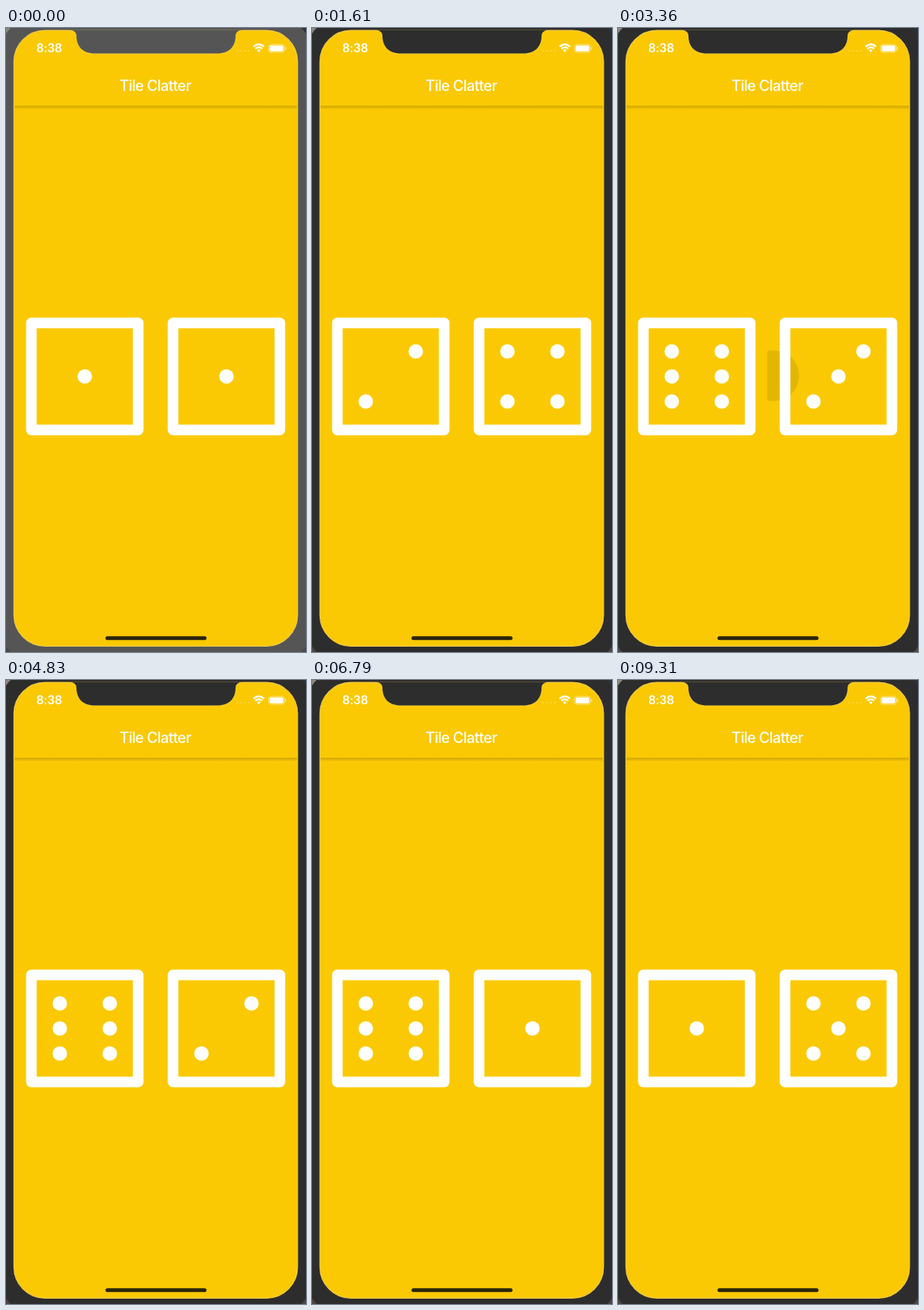
These frames come from a looping animation (396 by 822 pixels, 9.38 s). An HTML page without scripts:

```html
<!DOCTYPE html>
<html lang="en">
<head>
<meta charset="utf-8">
<title>Dice roller</title>
<style>
  html, body { margin: 0; width: 100%; height: 100%; overflow: hidden; background: #4a4846; }
  svg { display: block; width: 100vw; height: 100vh; }
  :root {
    --loop: 9.38s;
    --one: path("M0 0h0");
    --two: path("M33-33h0M-33 33h0");
    --three: path("M33-33h0M0 0h0M-33 33h0");
    --four: path("M-33-33h0M33-33h0M-33 33h0M33 33h0");
    --five: path("M-33-33h0M33-33h0M0 0h0M-33 33h0M33 33h0");
    --six: path("M-33-33h0M33-33h0M-33 0h0M33 0h0M-33 33h0M33 33h0");
  }
  text { fill: #fff; font-family: Inter, Roboto, sans-serif; }
  .title { font-size: 19.5px; font-weight: 500; letter-spacing: -.6px; text-anchor: middle; }
  .clock { font-size: 15.5px; font-weight: 600; letter-spacing: -.2px; }
  .soft { filter: blur(.45px); }

  .bezel { fill: #2d2d2d; animation: focus var(--loop) step-end infinite; }
  @keyframes focus { 0% { fill: #555; } 5.97%, 100% { fill: #2d2d2d; } }
  .rim { fill: none; stroke: #f0c840; stroke-width: 1.4; }

  .frame { fill: none; stroke: #fff; stroke-width: 14; stroke-linejoin: round; }
  .pips { fill: none; stroke: #fff; stroke-width: 19.2; stroke-linecap: round; d: var(--one); }
  .left { animation: left var(--loop) step-end infinite; }
  .right { animation: right var(--loop) step-end infinite; }
  @keyframes left {
    0% { d: var(--one); }
    9.595% { d: var(--two); }
    21.855% { d: var(--six); }
    81.151% { d: var(--three); }
    90.405%, 100% { d: var(--one); }
  }
  @keyframes right {
    0% { d: var(--one); }
    14.925% { d: var(--four); }
    26.386% { d: var(--five); }
    35.608% { d: var(--three); }
    44.776% { d: var(--two); }
    68.23% { d: var(--one); }
    95.416%, 100% { d: var(--five); }
  }

  /* A tap: slow growth while pressed, then quick spread and fade */
  .tap { opacity: 0; animation: tap var(--loop) linear var(--at) infinite; }
  @keyframes tap {
    0% { r: 4px; opacity: 0; }
    .8% { opacity: .1; }
    1.6% { r: 20px; opacity: .1; }
    3.73%, 100% { r: 150px; opacity: 0; }
  }
</style>
</head>
<body>
<svg viewBox="0 0 396 822" preserveAspectRatio="none">
  <defs>
    <linearGradient id="shade" x2="0" y2="1">
      <stop stop-color="#9a7800" stop-opacity="0"/>
      <stop offset=".3" stop-color="#9a7800" stop-opacity=".38"/>
      <stop offset="1" stop-color="#9a7800" stop-opacity="0"/>
    </linearGradient>
    <rect id="display" x="10.5" y="3.3" width="374.3" height="811" rx="41"/>
    <clipPath id="screen"><use href="#display"/></clipPath>
    <clipPath id="leftButton"><rect x="10" y="381" width="187.7" height="156" rx="2"/></clipPath>
    <clipPath id="rightButton"><rect x="197.7" y="381" width="187.7" height="156" rx="2"/></clipPath>
    <rect id="die" class="frame" x="-70.5" y="-70.5" width="141" height="141"/>
    <path id="notch" d="M84 2.5Q93 3.5 93 10C93 25 102 33.5 117 33.5H279C294 33.5 303 25 303 10Q303 3.5 312 2.5"/>
  </defs>

  <!-- Desktop corners and phone body -->
  <rect width="396" height="822" fill="#4a4846"/>
  <rect width="198" height="400" fill="#8a877e"/>
  <rect x="198" width="198" height="400" fill="#26353e"/>

  <g class="soft">
    <rect class="bezel" x="-8" y="-14" width="412" height="850" rx="48"/>

    <g clip-path="url(#screen)">
      <rect width="396" height="822" fill="#fac903"/>
      <rect x="10" y="101.5" width="376" height="6" fill="url(#shade)"/>
      <use href="#notch" class="rim"/>
    </g>
    <use href="#display" class="rim"/>
    <use href="#notch" class="bezel"/>

    <!-- Status bar -->
    <text class="clock" x="40" y="32">8:38</text>
    <path d="M305.5 30h17" stroke="#fff" stroke-width="2.2" stroke-linecap="round" stroke-dasharray="0 5" opacity=".3"/>
    <path d="M326.8 24.6Q333.7 18.4 340.6 24.6M329.2 27.4Q333.7 23.4 338.2 27.4" fill="none" stroke="#fff" stroke-width="2.3"/>
    <path d="M331.3 29.3Q333.7 27.4 336.1 29.3L333.7 32Z" fill="#fff"/>
    <rect x="346.5" y="21.5" width="21" height="10.8" rx="3.2" fill="#fff" fill-opacity=".15" stroke="#fff" stroke-opacity=".4"/>
    <rect x="348" y="23" width="18" height="7.8" rx="2" fill="#fff"/>
    <path d="M369 25v4" stroke="#fff" stroke-width="1.4" opacity=".5"/>

    <text class="title" x="197" y="82.5">Tile Clatter</text>

    <!-- Ink from taps, behind the dice -->
    <g clip-path="url(#leftButton)">
      <circle class="tap" cx="192" cy="502" style="--at:.75s"/>
      <circle class="tap" cx="192" cy="502" style="--at:1.9s"/>
      <circle class="tap" cx="192" cy="502" style="--at:7.462s"/>
      <circle class="tap" cx="192" cy="502" style="--at:8.33s"/>
    </g>
    <g clip-path="url(#rightButton)">
      <circle class="tap" cx="205.5" cy="458" style="--at:1.25s"/>
      <circle class="tap" cx="205.5" cy="458" style="--at:2.325s"/>
      <circle class="tap" cx="205.5" cy="458" style="--at:3.19s"/>
      <circle class="tap" cx="205.5" cy="458" style="--at:4.05s"/>
      <circle class="tap" cx="205.5" cy="458" style="--at:6.25s"/>
      <circle class="tap" cx="205.5" cy="458" style="--at:8.8s"/>
    </g>

    <g transform="translate(104 459)">
      <use href="#die"/>
      <path class="pips left"/>
    </g>
    <g transform="translate(291 459)">
      <use href="#die"/>
      <path class="pips right"/>
    </g>

    <rect x="131.3" y="801.3" width="133.4" height="5" rx="2.5" fill="#2b240c"/>
  </g>
</svg>
</body>
</html>
```
